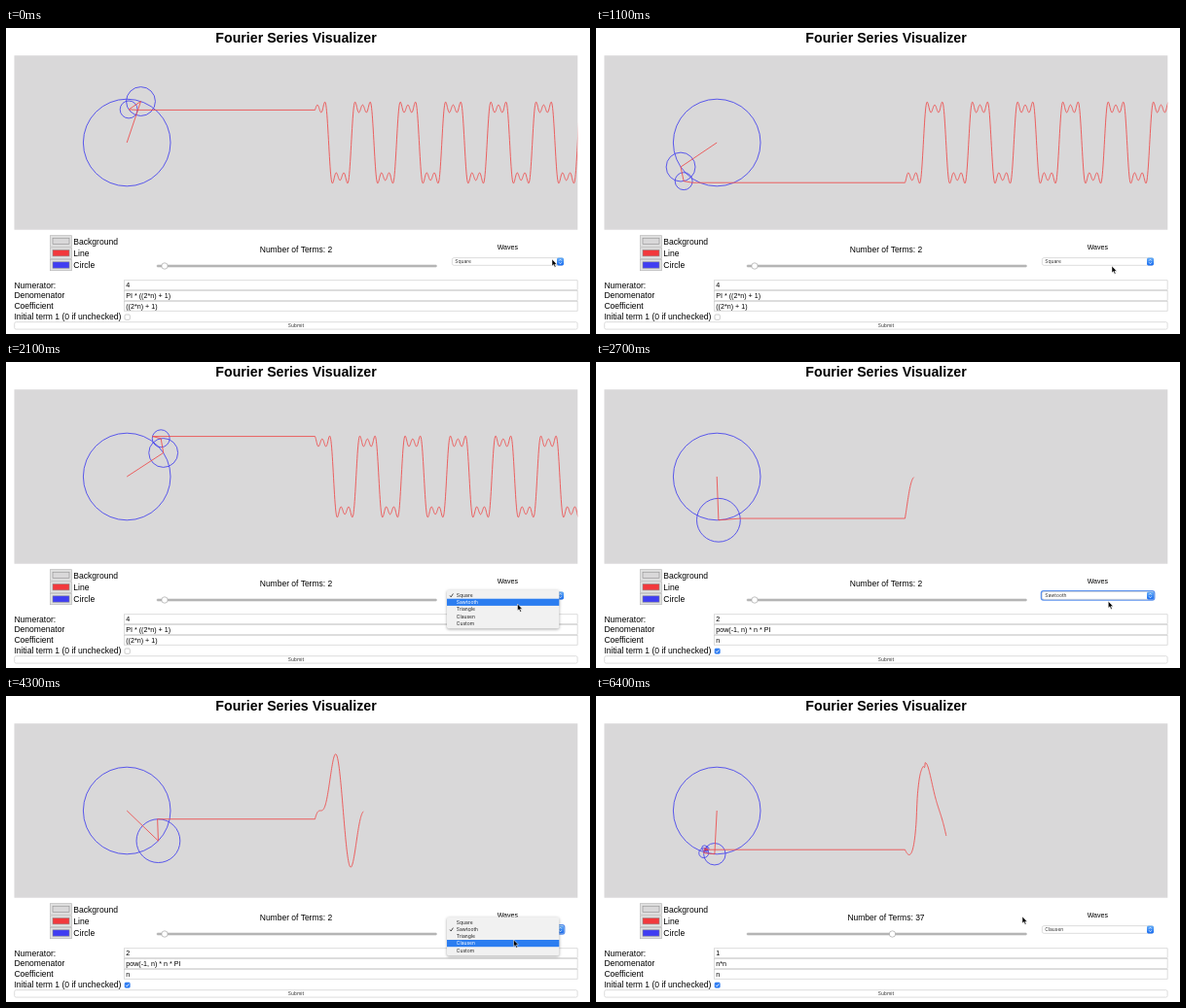
Recreate the animation shown at these times as an HTML page. Size 600 by 315 pixels, loop 6500 ms.

```html
<!DOCTYPE html>
<html lang="en">
<head>
<meta charset="utf-8">
<title>Fourier Series Visualizer</title>
<style>
  html, body { margin: 0; width: 100%; height: 100%; overflow: hidden; background: #fff; }
  svg { display: block; width: 100vw; height: 100vh; }
  text { font: 8.57px "Liberation Sans", Arial, sans-serif; fill: #000; white-space: pre; }
  .title { font-size: 14.2px; font-weight: bold; }
  .middle { text-anchor: middle; }
  .field { font-size: 7.15px; }
  .small { font: 5px Inter, Roboto, sans-serif; fill: #333; }
  .box { fill: #fff; stroke: #c6c6c6; stroke-width: .6; }
  .trace { fill: none; stroke: #ee4a4a; stroke-width: .85; stroke-linejoin: round; }
  .circles { fill: none; stroke: #4340ee; stroke-width: .85; }
  #popup { filter: drop-shadow(0 1px 1.5px rgba(0, 0, 0, .35)); }
</style>
</head>
<body>
<svg viewBox="0 0 600 315">
  <defs>
    <linearGradient id="blue" x2="0" y2="1">
      <stop stop-color="#68b0f8"/><stop offset="1" stop-color="#176af0"/>
    </linearGradient>
    <clipPath id="view"><rect x="8.5" y="28.3" width="578.8" height="179.4"/></clipPath>
  </defs>
  <text class="title middle" x="298" y="15.2">Fourier Series Visualizer</text>

  <rect x="8.5" y="28.3" width="578.8" height="179.4" fill="#d9d8d9"/>
  <g clip-path="url(#view)">
    <path id="circles" class="circles"/>
    <path id="arms" class="trace"/>
    <path id="wave" class="trace"/>
  </g>

  <g id="swatches"></g>

  <text id="count" class="middle" x="298" y="230.8" style="font-size:8.5px"></text>
  <rect x="155" y="243.9" width="287.5" height="2.2" rx="1" fill="#b8b8b8" stroke="#a2a2a2" stroke-width=".4"/>
  <circle id="thumb" cy="245" r="3.2" fill="#fff" stroke="#999" stroke-width=".6"/>

  <text class="middle" x="515.3" y="227.6" style="font-size:7.05px">Waves</text>
  <rect id="ring" x="457.5" y="235.8" width="116.2" height="9.2" rx="2.2" fill="none" stroke="#5c92ee" stroke-width="1.5"/>
  <rect class="box" x="458.4" y="236.6" width="114.4" height="7.7" rx="1.8"/>
  <rect x="566" y="236.4" width="7" height="8" rx="1.6" fill="url(#blue)"/>
  <path d="M568.2 239.6l1.3-1.5 1.3 1.5M568.2 241.3l1.3 1.5 1.3-1.5" fill="none" stroke="#fff" stroke-width=".7"/>
  <text id="choice" class="small" x="461.2" y="242.3"></text>

  <g id="form"></g>
  <text x="8.4" y="299.9">Initial term 1 (0 if unchecked)</text>
  <rect id="check" x="122" y="295" width="5.3" height="5.3" rx="1.1" stroke-width=".6"/>
  <path d="M123.2 297.7l1.1 1.3 1.9-2.7" fill="none" stroke="#fff" stroke-width=".8"/>
  <rect class="box" x="8.7" y="302.7" width="578.4" height="7.4" rx="1.6"/>
  <text class="small middle" x="298" y="308.2">Submit</text>

  <g id="popup">
    <rect x="453" y="234.5" width="115.3" height="39.8" rx="2" fill="#f1f1f1"/>
    <rect id="highlight" x="453" width="115.3" height="7.2" fill="#2b7df0"/>
    <g id="items"></g>
    <path id="tick" d="M456 0l1.2 1.5 2.2-3.4" fill="none" stroke-width=".8"/>
  </g>
  <path id="cursor" d="M0 0V7l1.6-1.4 1.2 2.7 1.2-.5-1.2-2.6H5z" fill="#000" stroke="#fff" stroke-width=".5"/>
</svg>
<script>
const LOOP = 6500, STEP = 100;
const CENTER = { x: 124.2, y: 118 }, RADIUS = 44.8;
const WAVE_X = 317.5, PX_PER_DEG = 46.5 / 360, ROW = 7.2;

const names = ["Square", "Sawtooth", "Triangle", "Clausen", "Custom"];
const modes = [
  { item: 0, start: -Infinity, first: 0, fields: ["4", "PI * ((2*n) + 1)", "((2*n) + 1)"],
    freq: n => 2 * n + 1, amp: n => 1 / (2 * n + 1) },
  { item: 1, start: 377, first: 1, fields: ["2", "pow(-1, n) * n * PI", "n"],
    freq: n => n, amp: n => (n % 2 ? 1 : -1) / n },
  { item: 3, start: 844, first: 1, fields: ["1", "n*n", "n"],
    freq: n => n, amp: n => 1 / (n * n) }
];

// Tracks: rows of [position, value, ...]
const phaseTrack = [[0, -71.4], [1100, 146], [2100, 326.8], [3400, 589], [4300, 764], [5300, 949.5], [6400, 1173], [6500, 1193]];
const termTrack = [[1012, 2], [1085, 37]];
const cursorTrack = [
  [0, 561, 238], [700, 545, 239], [1100, 530, 245], [1300, 530, 243], [2100, 525.5, 249],
  [2400, 526, 248], [3400, 527, 242], [3700, 527, 241], [4300, 521.5, 250.9], [4700, 521, 252],
  [5300, 291, 245.5], [5600, 163, 245], [5950, 304.5, 245], [6400, 438, 227]
];

const $ = id => document.getElementById(id);
const svgText = (x, y, text, cls = "") => `<text x="${x}" y="${y}" class="${cls}">${text}</text>`;
const setAll = (id, attrs) => Object.entries(attrs).forEach(([k, v]) => $(id).setAttribute(k, v));
const show = (id, on) => $(id).style.display = on ? "" : "none";

function sample(track, at) {
  if (at <= track[0][0]) return track[0].slice(1);
  const i = track.findIndex(row => row[0] > at);
  if (i < 0) return track[track.length - 1].slice(1);
  const a = track[i - 1], b = track[i], u = (at - a[0]) / (b[0] - a[0]);
  return a.slice(1).map((v, j) => v + (b[j + 1] - v) * u);
}

const termsAt = phase => Math.round(sample(termTrack, phase)[0]);

// Joints of the rotating arms, from the centre to the drawing tip
function joints(mode, phase) {
  let { x, y } = CENTER;
  const points = [{ x, y, r: 0 }], last = termsAt(phase);
  for (let n = mode.first; n <= last; n++) {
    const angle = mode.freq(n) * phase * Math.PI / 180, r = RADIUS * mode.amp(n);
    x += r * Math.cos(angle);
    y += r * Math.sin(angle);
    points.push({ x, y, r: Math.abs(r) });
  }
  return points;
}

const polyline = points => "M" + points.map(p => `${p.x.toFixed(2)} ${p.y.toFixed(2)}`).join("L");
const ring = (c, r) => `M${c.x - r} ${c.y}a${r} ${r} 0 1 0 ${2 * r} 0a${r} ${r} 0 1 0 ${-2 * r} 0`;

function drawSeries(mode, phase) {
  const chain = joints(mode, phase), tip = chain[chain.length - 1];
  $("circles").setAttribute("d", chain.slice(1).map((p, i) => ring(chain[i], p.r)).join(""));
  $("arms").setAttribute("d", polyline([...chain, { x: WAVE_X, y: tip.y }]));
  const oldest = Math.max(mode.start, phase - 2130), trail = [];
  for (let p = phase; p > oldest; p -= 2.5) {
    trail.push({ x: WAVE_X + (phase - p) * PX_PER_DEG, y: joints(mode, p).pop().y });
  }
  $("wave").setAttribute("d", polyline(trail));
}

function drawPopup(open, selected, cursorY) {
  show("popup", open);
  if (!open) return;
  const hover = Math.max(0, Math.min(4, selected + Math.round((cursorY - 240) / ROW)));
  setAll("popup", { transform: `translate(0 ${-selected * (ROW - .1)})` });
  setAll("highlight", { y: 236.5 + hover * ROW });
  [...$("items").children].forEach((item, i) => item.style.fill = i === hover ? "#fff" : "#222");
  setAll("tick", { transform: `translate(0 ${240.4 + selected * ROW})`, stroke: hover === selected ? "#fff" : "#222" });
}

function render(t) {
  const [phase] = sample(phaseTrack, t), [cx, cy] = sample(cursorTrack, t);
  const mode = modes.filter(m => phase >= m.start).pop(), terms = termsAt(phase);
  const index = modes.indexOf(mode);
  drawSeries(mode, phase);
  $("count").textContent = `Number of Terms: ${terms}`;
  setAll("thumb", { cx: 154.9 + 4.043 * terms });
  $("choice").textContent = names[mode.item];
  mode.fields.forEach((value, i) => $("field" + i).textContent = value);
  setAll("check", mode.first ? { fill: "#2f7df2", stroke: "#2f7df2" } : { fill: "#fff", stroke: "#aaa" });
  show("ring", index > 0 && t < 5600);
  drawPopup((index === 0 && t >= 1300) || (index === 1 && t >= 3700), mode.item, cy);
  setAll("cursor", { transform: `translate(${cx} ${cy})` });
}

$("swatches").innerHTML = [["Background", "#d9d8d9"], ["Line", "#f2383c"], ["Circle", "#403df2"]]
  .map(([label, color], i) => {
    const y = 213.7 + i * 12.3;
    return `<rect x="45.6" y="${y}" width="21.8" height="11.4" fill="#e2e2e2" stroke="#b5b5b5" stroke-width=".7"/>
      <rect x="48" y="${y + 2.5}" width="17" height="6.4" fill="${color}" stroke="#8b8b8b" stroke-width=".6"/>`
      + svgText(69.3, y + 8.8, label);
  }).join("");

$("form").innerHTML = ["Numerator:", "Denomenator", "Coefficient"].map((label, i) => {
  const y = 259.8 + i * 10.75;
  return svgText(8.4, y + 7.9, label)
    + `<rect class="box" x="121.3" y="${y}" width="465.8" height="9.9"/>`
    + `<text id="field${i}" class="field" x="123.2" y="${y + 7.4}"></text>`;
}).join("");

$("items").innerHTML = names.map((name, i) => svgText(462.8, 241.9 + i * ROW, name, "small")).join("");

const begin = performance.now();
function tick() {
  const t = (performance.now() - begin) % LOOP;
  render(Math.floor(t / STEP) * STEP);
  requestAnimationFrame(tick);
}
tick();
</script>
</body>
</html>
```
